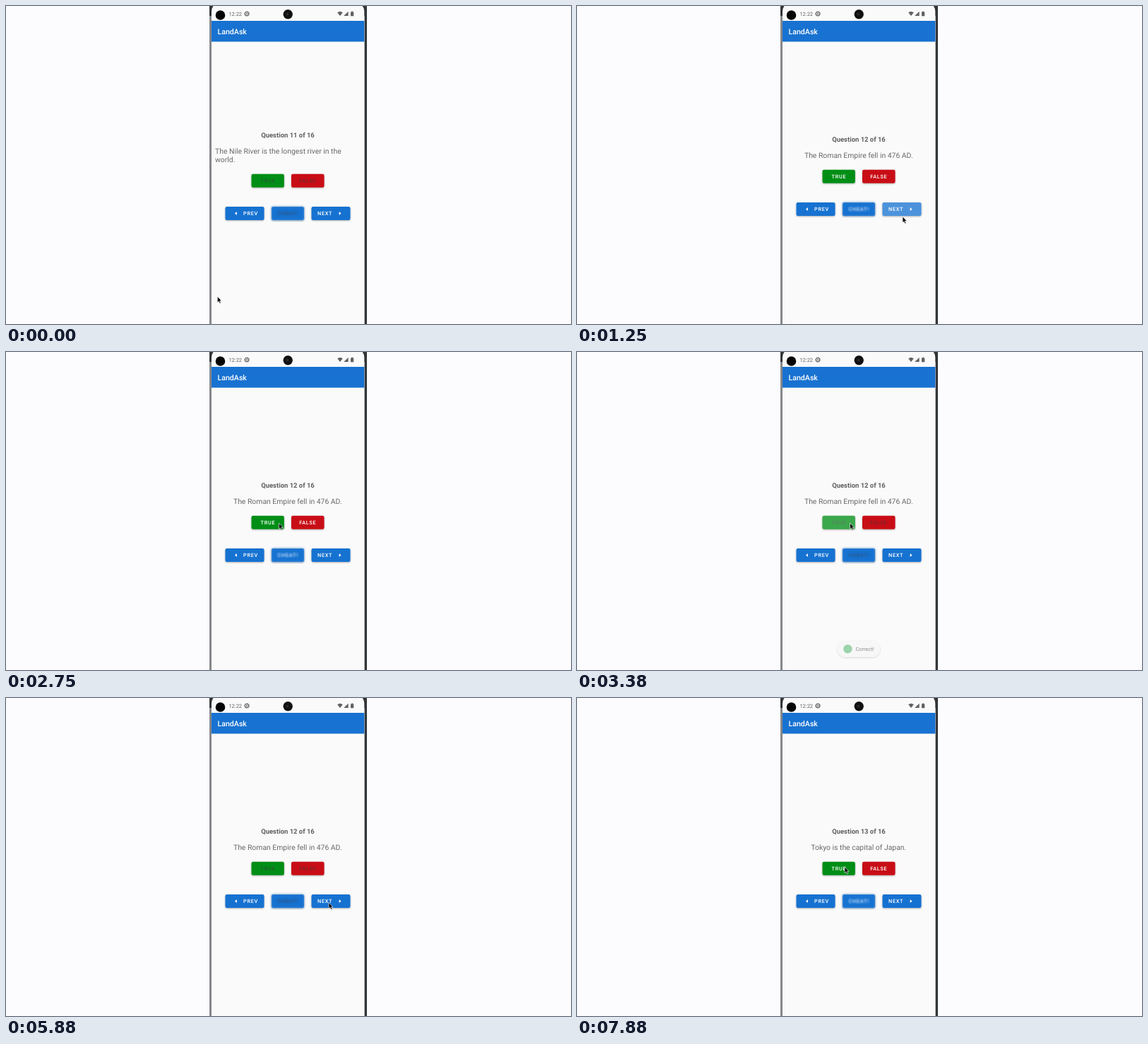
An HTML page that plays this animation: 800x450 px, repeating every 8000 ms.

```html
<!DOCTYPE html>
<html lang="en">
<head>
<meta charset="utf-8">
<title>Quiz app</title>
<style>
  html, body { margin: 0; width: 100%; height: 100%; overflow: hidden; background: #fcfcfe; }
  svg { display: block; width: 800px; height: 450px; }
  text { font-family: Roboto, Arial, sans-serif; text-rendering: geometricPrecision; }
  .caps { font-size: 7.36px; font-weight: 500; letter-spacing: .68px; fill: #fff; }
  .body { font-size: 10.4px; fill: #696969; }
</style>
</head>
<body>
<svg viewBox="0 0 800 450">
  <defs>
    <filter id="shadow" x="-20%" y="-30%" width="140%" height="180%">
      <feDropShadow dx="0" dy="0.8" stdDeviation="0.8" flood-color="#000" flood-opacity=".35"/>
    </filter>
    <filter id="soft" x="-20%" y="-40%" width="140%" height="180%">
      <feGaussianBlur stdDeviation="0.8"/>
    </filter>
  </defs>

  <rect width="800" height="450" fill="#fcfcfe"/>

  <!-- Phone body and screen -->
  <rect x="288" y="-6" width="223" height="470" rx="14" fill="#85878a"/>
  <rect x="508.3" y="4" width="2.5" height="460" fill="#24282a"/>
  <path d="M288 0H511V14H288Z" fill="#333638"/>
  <rect x="291" y="-6" width="216.3" height="470" rx="14" fill="#fafafa"/>
  <rect x="291" y="21" width="216.3" height="29.5" fill="#1872d1"/>
  <text x="299.5" y="40" font-size="10.6" font-weight="500" fill="#fff">LandAsk</text>

  <!-- Status bar -->
  <circle cx="303.5" cy="13" r="6.8" fill="#050505"/>
  <circle cx="399.2" cy="11.8" r="6.7" fill="#111"/>
  <circle cx="398.4" cy="11.6" r="1.8" fill="#292c30"/>
  <text x="315.4" y="13.8" font-size="7.5" fill="#666">12:22</text>
  <g fill="#626262">
    <circle cx="341" cy="11" r="2.7" fill="none" stroke="#666" stroke-width="1.2"/>
    <circle cx="341" cy="11" r="3.4" fill="none" stroke="#666" stroke-width=".7" stroke-dasharray="1.3 1.37"/>
    <circle cx="341" cy="11" r="1"/>
    <path d="M469.2 9.2Q473 6.2 476.8 9.2L473 14Z"/>
    <path d="M484.6 7.7V14H478.2Z"/>
    <path d="M488 8.5H489.2V7.5H491.2V8.5H492.3V14.2H488Z"/>
  </g>

  <!-- Quiz -->
  <text id="count" x="399" text-anchor="middle" font-size="9.46" font-weight="700" fill="#5f5f5f"></text>
  <text id="line1" class="body"></text>
  <text id="line2" class="body" x="296" y="221.1">world.</text>
  <g id="answers"></g>
  <g id="controls"></g>

  <g id="toast">
    <rect x="369" y="409" width="60" height="22.8" rx="11.4" fill="#f6f6f6" filter="url(#shadow)"/>
    <circle cx="383.4" cy="420.2" r="6.2" fill="#3fae60"/>
    <text x="394.4" y="422.9" font-size="7.4" fill="#222">Correct!</text>
  </g>

  <path id="cursor" d="M0 0V8.6L2 6.9L3.4 10L4.9 9.4L3.5 6.3H6Z" fill="#080808" stroke="#fff" stroke-width=".6" stroke-linejoin="round"/>
</svg>

<script>
const LOOP = 8000, STEP = 125;
const $ = id => document.getElementById(id);

// Moves between resting places of the pointer: start, end, from, to
const moves = [
  [250, 875, [299.3, 411], [461, 298]],
  [1625, 2000, [461, 298], [386.5, 242]],
  [3750, 4375, [386.5, 242], [457, 283]],
  [4750, 5125, [457, 283], [457, 289.5]],
  [7125, 7625, [457, 289.5], [379, 239]]
];

const questions = [
  { from: 0, number: 11, text: "The Nile River is the longest river in the", wrapped: true },
  { from: 1125, number: 12, text: "The Roman Empire fell in 476 AD." },
  { from: 6500, number: 13, text: "Tokyo is the capital of Japan." }
];

function button(parent, id, x, width, color, label, textX, extra = "") {
  const blurred = id === "cheat" ? 'filter="url(#soft)"' : "";
  $(parent).insertAdjacentHTML("beforeend", `
    <g>
      <rect x="${x}" width="${width}" height="19" rx="2.3" fill="${color}" filter="url(#shadow)"/>
      ${blurred && `<rect x="${x}" y="-.2" width="${width}" height="19.4" rx="2.3" fill="none" stroke="#5794d2" stroke-width="1" ${blurred}/>`}
      <text id="${id}" class="caps" x="${textX}" y="12.2" ${blurred}>${label}</text>
      ${extra}
      <rect id="${id}Ripple" x="${x}" width="${width}" height="19" rx="2.3" fill="#fff" opacity="0"/>
    </g>`);
}

const arrow = d => `<path d="${d}" fill="#fff"/>`;
button("answers", "true", 347.5, 46.3, "#058e17", "TRUE", 360.5);
button("answers", "false", 404, 46.5, "#c80d12", "FALSE", 415.2);
button("controls", "prev", 310.5, 55, "#1872d1", "PREV", 336, arrow("M326.8 7V12L324 9.5Z"));
button("controls", "cheat", 376, 46, "#1872d1", "CHEAT!", 384.6);
button("controls", "next", 432.5, 55, "#1872d1", "NEXT", 441, arrow("M471.7 7V12L474.5 9.5Z"));

const clamp = v => Math.min(1, Math.max(0, v));
const ramp = (t, a, b) => clamp((t - a) / (b - a));
const ease = u => u * u * (3 - 2 * u);
const pulse = (t, start) => .23 * ramp(t, start - 125, start + 125) * (1 - ramp(t, start + 250, start + 625));

function cursorAt(t) {
  const [a, b, from, to] = moves.filter(m => t >= m[0]).pop() || moves[0];
  const u = ease(ramp(t, a, b));
  return from.map((v, i) => v + (to[i] - v) * u);
}

function render(t) {
  const q = questions.filter(item => t >= item.from).pop();
  const shift = q.wrapped ? 6 : 0;
  $("count").textContent = `Question ${q.number} of 16`;
  $("count").setAttribute("y", 191.7 - shift);
  const line = $("line1");
  line.textContent = q.text;
  line.setAttribute("x", q.wrapped ? 296 : 398.8);
  line.setAttribute("y", q.wrapped ? 208.9 : 215.1);
  line.setAttribute("text-anchor", q.wrapped ? "start" : "middle");
  $("line2").style.display = q.wrapped ? "" : "none";
  $("answers").setAttribute("transform", `translate(0 ${231.8 + shift})`);
  $("controls").setAttribute("transform", `translate(0 ${278 + shift})`);

  const answered = q.wrapped || (t >= 3250 && t < 6500);
  for (const id of ["true", "false", "cheat"]) {
    $(id).style.fill = answered ? "rgba(60,60,60,.6)" : "#fff";
    $(id).style.fillOpacity = id === "cheat" && !answered ? .85 : 1;
  }
  $("nextRipple").setAttribute("opacity", pulse(t, 1125) + pulse(t, 6500));
  $("trueRipple").setAttribute("opacity", pulse(t, 3250));
  $("toast").setAttribute("opacity", ramp(t, 3250, 3500) * (1 - ramp(t, 5375, 5750)));
  $("cursor").setAttribute("transform", `translate(${cursorAt(t)})`);
}

function tick(now) {
  render(Math.floor((now % LOOP) / STEP) * STEP);
  requestAnimationFrame(tick);
}
render(0);
requestAnimationFrame(tick);
</script>
</body>
</html>
```
